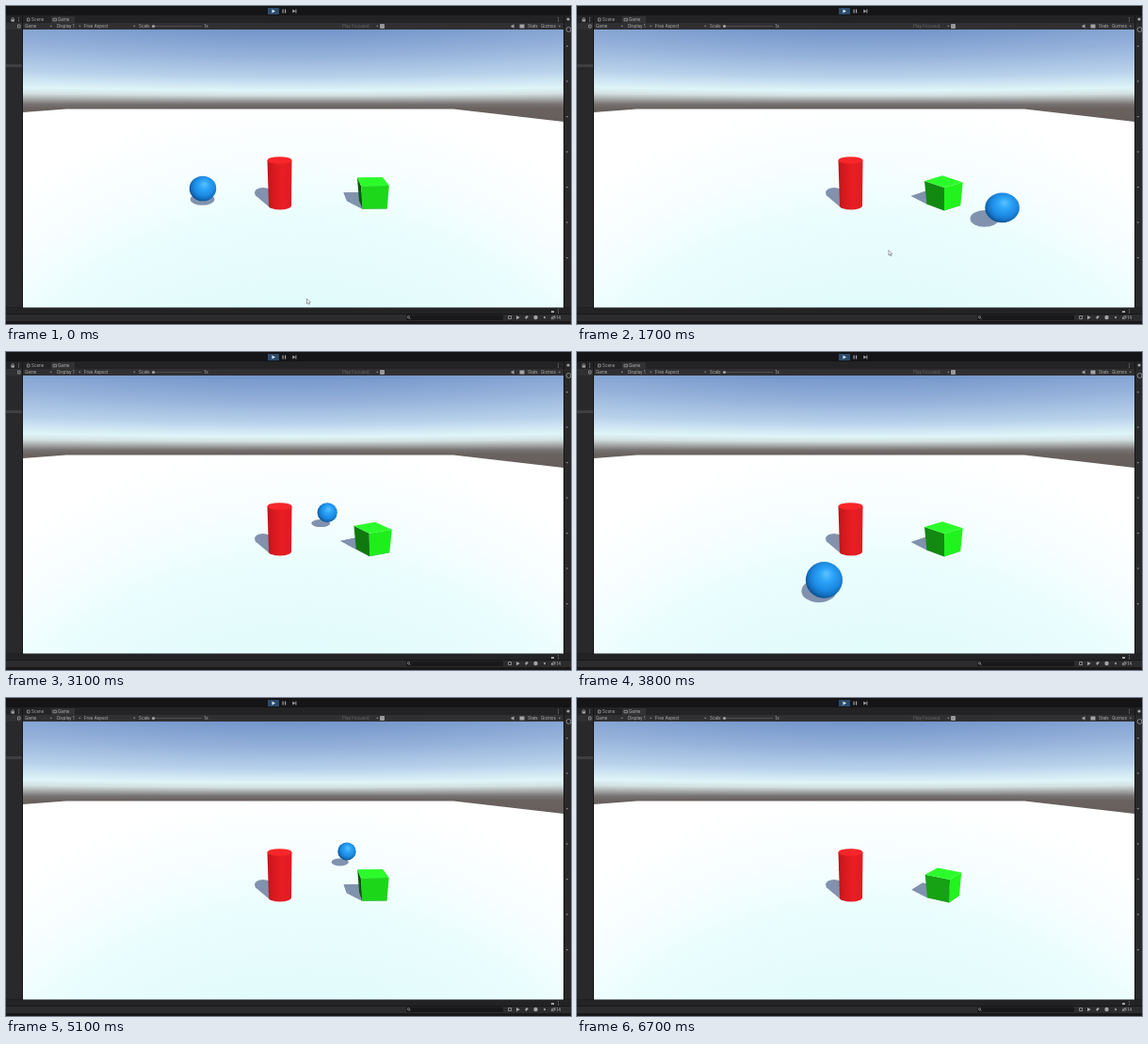
Write an HTML page with a canvas that moves like this. It is 600 by 338 pixels and loops after 7000 ms.

```html
<!DOCTYPE html>
<html lang="en">
<head>
<meta charset="utf-8">
<title>Look-at scene</title>
<style>
  html, body { margin: 0; width: 100%; height: 100%; overflow: hidden; background: #19191b; }
  canvas, svg { position: absolute; left: 0; top: 0; width: 600px; height: 338px; display: block; }
  text { font: 4.5px Inter, Roboto, sans-serif; fill: #b4b4b4; }
  .dim { fill: #69696b; }
  .line { fill: none; stroke: #9c9c9e; stroke-width: .8; }
  .icon { fill: #a4a4a6; }
  #arrows { fill: #858587; }
</style>
</head>
<body>
<canvas id="view" width="600" height="338"></canvas>
<svg viewBox="0 0 600 338">
  <path fill="#151417" d="M0 0h600v10H0z"/>
  <path fill="#232325" d="M0 10h600v8H0z"/>
  <path fill="#303032" d="M0 18h600v7H0z"/>
  <path fill="#29292b" d="M0 25h18v296H0zM592 18h8v303h-8z"/>
  <path fill="#161618" d="M17 10h1v311h-1zM592 10h1v311h-1z"/>
  <path fill="#404042" d="M0 62h17v3H0z"/>
  <path fill="#323234" d="M48 11h25v7H48z"/>
  <path fill="#18181a" d="M0 320.500h600V338H0z"/>
  <path fill="#232325" d="M0 321h600v6H0z"/>
  <path fill="#2c2c2e" d="M0 328h600v7H0z"/>
  <rect x="425" y="328.500" width="103" height="5.500" rx="1" fill="#19191b"/>

  <rect x="278" y="2" width="12" height="7" fill="#2c4b6c"/>
  <path fill="#d8e6f5" d="M282.500 3.500l3.500 2-3.500 2z"/>
  <path class="icon" d="M293.500 3.500h1.200v4h-1.200zM296 3.500h1.200v4H296zM304.300 3.500l3 2-3 2zM307.400 3.500h1v4h-1z"/>

  <path class="line" d="M22.500 13h2.500v3h-2.500zM50 13.300h3.500v2.400H50zM6 15v-1.300a1.200 1.200 0 0 1 2.400 0V15M12.500 20h2.500v3h-2.500z"/>
  <path class="icon" d="M5.500 14.300h3.400v2.300H5.500z"/>
  <text x="27" y="16.200">Scene</text>
  <text x="55" y="16.200">Game</text>
  <text x="20" y="23">Game</text>
  <text x="54" y="23">Display 1</text>
  <text x="83" y="23">Free Aspect</text>
  <text x="141" y="23">Scale</text>
  <text x="210.500" y="23">1x</text>
  <text x="357" y="23" class="dim">Play Focused</text>
  <text x="554" y="23">Stats</text>
  <text x="568" y="23">Gizmos</text>
  <path stroke="#555557" stroke-width=".8" d="M157 21.500h51"/>
  <circle class="icon" cx="156.500" cy="21.500" r="1.600"/>
  <rect x="397" y="19" width="5" height="5" rx="1" fill="#98989a"/>
  <path class="icon" d="M536.500 20.500h1.300l1.700-1.300v4.600l-1.700-1.300h-1.300zM545.500 19.500h5v4h-5z"/>
  <circle class="icon" cx="597" cy="14" r="1.600"/>
  <circle class="line" cx="597.500" cy="25" r="2.500"/>
  <path id="arrows"/>
  <path id="dots" class="icon"/>

  <circle class="line" cx="427.500" cy="330.700" r="1.100"/>
  <path class="line" d="M428.300 331.700l1 1M533.500 329.500h3v3h-3zM579 331.200q2.300-3 4.600 0q-2.300 3-4.600 0M579 333l4.600-4"/>
  <path class="icon" d="M542 329l3.800 2-3.800 2.200zM551 331l2-2 1.800 1-2.300 3zM570.800 331l1.200-1.600 1.200 1.600-1.200 1.600zM579 324h3v2h-3z"/>
  <circle class="icon" cx="562.500" cy="331" r="2.200"/>
  <text x="584.500" y="332.700">14</text>
</svg>
<script>
const ctx = document.getElementById('view').getContext('2d');
const LOOP = 7000, STEP = 100;
const SHADOW = '#8092ae';

// The ball rounds both solids: one waypoint every LEG ms, starting at START.
const START = 800, END = 6700, LEG = 400;
const WAYPOINTS = [
  [209, 194], [255, 236], [425, 222], [489, 188],
  [418, 175], [372, 160], [335, 178], [338, 226],
  [185, 246], [173, 192], [258, 164], [385, 167],
  [374, 207], [214, 211], [212, 178], [313, 170]
];

const clamp = (v, lo, hi) => Math.min(Math.max(v, lo), hi);

// Catmull-Rom
function blend(a, b, c, d, u) {
  return b + u / 2 * (c - a + u * (2 * a - 5 * b + 4 * c - d + u * (3 * (b - c) + d - a)));
}

function ballAt(time) {
  const pos = (clamp(time, START, END) - START) / LEG, i = Math.floor(pos);
  const near = [-1, 0, 1, 2].map(k => WAYPOINTS[clamp(i + k, 0, WAYPOINTS.length - 1)]);
  const [x, y] = [0, 1].map(axis => blend(...near.map(p => p[axis]), pos - i));
  return { x, y, r: (y - 86) / 8.1 };
}

// Widening of things away from the middle of a perspective view
const stretch = x => Math.hypot(1, (x - 305) / 255);

function poly(points, fill, c = ctx) {
  c.fillStyle = fill;
  c.beginPath();
  points.forEach(p => c.lineTo(p[0], p[1]));
  c.closePath();
  c.fill();
}

function oval(x, y, rx, ry, fill) {
  ctx.fillStyle = fill;
  ctx.beginPath();
  ctx.ellipse(x, y, rx, ry, 0, 0, 2 * Math.PI);
  ctx.fill();
}

function stops(gradient, list) {
  list.forEach(([at, color]) => gradient.addColorStop(at, color));
  return gradient;
}

function makeBackdrop() {
  const layer = document.createElement('canvas');
  layer.width = 600;
  layer.height = 338;
  const c = layer.getContext('2d'), horizon = 103;
  for (let x = 18; x < 592; x += 2) {
    const k = 1 + (stretch(x) - 1) * .5;
    c.fillStyle = stops(c.createLinearGradient(0, horizon - 80 * k, 0, horizon + 20 * k), [
      [0, '#7093c8'], [.3, '#94b1da'], [.52, '#b7d0ea'], [.67, '#dff5f9'],
      [.72, '#d3e0e1'], [.77, '#a2a4a4'], [.81, '#787373'], [.85, '#69625f'], [1, '#645d5b']
    ]);
    c.fillRect(x, 25, 2, 100);
  }
  const ground = stops(c.createRadialGradient(310, 620, 280, 310, 620, 520), [
    [0, '#e0fbfc'], [.5, '#ebfdfd'], [.75, '#f8feff'], [1, '#fff']
  ]);
  poly([[18, 113], [64, 109.5], [475, 109.5], [592, 123], [592, 321], [18, 321]], ground, c);
  return layer;
}

// The cube turns so that one side always faces the ball.
function cubeFor(ball) {
  const z = 1013 / (ball.y - 88.2);
  const x = (ball.x - 305) * z / 255.5;
  const yaw = Math.atan2(x - 3.1, (9.8 - z) / .95);
  const top = [0, 1, 2, 3].map(i => {
    const a = yaw + (i - .5) * Math.PI / 2;
    const u = Math.sin(a) * .707, v = Math.cos(a) * .707;
    return [389.2 + 4.5 * v + 28.5 * u * (1 + .1 * v), 186.7 + 9 * v];
  });
  const base = top.map(([x, y]) => [389.2 + (x - 389.2) * .88, y + 24.5]);
  return { yaw, top, base };
}

function cubeShadow({ base }) {
  const far = base.map(([x, y]) => [x - 16.5, y - 8.5]);
  poly(far, SHADOW);
  base.forEach((p, i) => {
    const j = (i + 1) % 4;
    poly([p, base[j], far[j], far[i]], SHADOW);
  });
}

function drawCube({ yaw, top, base }) {
  top.forEach((p, i) => {
    const j = (i + 1) % 4;
    if (top[j][0] <= p[0]) return;
    const light = 155 + 90 * Math.cos(yaw + i * Math.PI / 2 - .87);
    poly([p, top[j], base[j], base[i]], `rgb(${light * .13},${light},${light * .12})`);
  });
  poly(top, '#2cfb2b');
}

function drawCylinder() {
  ctx.fillStyle = stops(ctx.createLinearGradient(278, 0, 304, 0), [
    [0, '#c0151a'], [.25, '#d81a1f'], [.6, '#e81e23'], [1, '#de1c22']
  ]);
  ctx.beginPath();
  ctx.moveTo(277.5, 164);
  ctx.lineTo(279, 212.5);
  ctx.ellipse(291, 212.5, 12, 4, 0, Math.PI, 0, true);
  ctx.lineTo(303.5, 164);
  ctx.fill();
  oval(290.5, 164, 13, 3.8, '#f7262a');
}

function cylinderShadow() {
  oval(273, 198.5, 9, 5.5, SHADOW);
  poly([[264.5, 201], [281, 215], [292, 213], [280, 195]], SHADOW);
}

function drawBall({ x, y, r }) {
  const k = stretch(x);
  ctx.save();
  ctx.translate(x, y);
  ctx.scale(r * k, r);
  oval(0, 0, 1, 1, stops(ctx.createRadialGradient(.12, -.35, .05, .12, -.12, 1.15), [
    [0, '#55bffe'], [.3, '#2da4f8'], [.65, '#1c8ae3'], [.85, '#1470bf'], [1, '#0b4f8f']
  ]));
  ctx.restore();
}

function ballShadow({ x, y, r }) {
  oval(x - r * (x - 202) / 210, y + 11.5, r * .96, Math.max(r - 7, 4), SHADOW);
}

function drawCursor(time) {
  if (time >= 2100) return;
  const s = clamp((time - 400) / 800, 0, 1);
  ctx.save();
  ctx.translate(319.5 + 11.5 * s, 311 - 51.5 * s);
  ctx.strokeStyle = '#666';
  ctx.lineWidth = .6;
  poly([[0, 0], [0, 5.6], [1.3, 4.4], [2.2, 6.3], [3, 5.9], [2.1, 4.1], [3.8, 4]], '#fff');
  ctx.stroke();
  ctx.restore();
}

const backdrop = makeBackdrop();

function draw(time) {
  const ball = ballAt(time), cube = cubeFor(ball);
  ctx.clearRect(0, 0, 600, 338);
  ctx.drawImage(backdrop, 0, 0);
  cylinderShadow();
  cubeShadow(cube);
  ballShadow(ball);

  // Lower on the stage is nearer
  [[191, drawCylinder], [195, () => drawCube(cube)], [ball.y, () => drawBall(ball)]]
    .sort((a, b) => a[0] - b[0])
    .forEach(item => item[1]());
  drawCursor(time);
}

function addMarks(id, points, shape) {
  document.getElementById(id).setAttribute('d', points.map(p => `M${p}${shape}`).join(''));
}
const menus = [46.5, 77, 135, 393, 586.5].map(x => [x, 20.7]);
const rows = Array.from({ length: 7 }, (_, i) => [594.5, 42 + 37.5 * i]);
addMarks('arrows', [...menus, ...rows], 'h2.6l-1.300 1.700z');
addMarks('dots', [[13, 12], [586, 12], [586, 322]], 'h.8v.8h-.8zm0 1.800h.8v.8h-.8zm0 1.800h.8v.8h-.8z');

const start = performance.now();
function tick() {
  const time = (performance.now() - start) % LOOP;
  draw(Math.floor(time / STEP) * STEP);
  requestAnimationFrame(tick);
}
tick();
</script>
</body>
</html>
```
